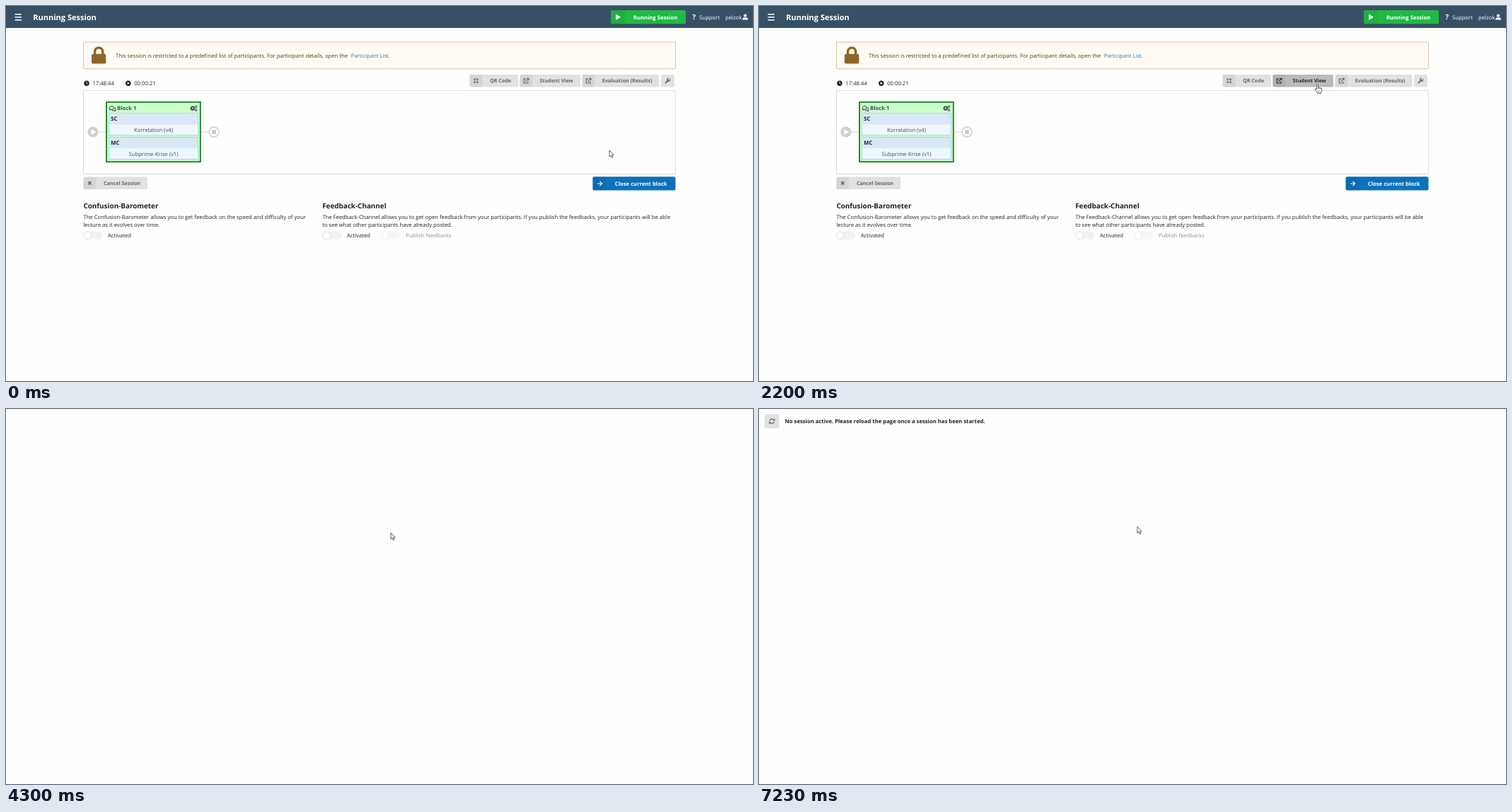
Write an HTML page that moves like this. It is 1056x530 px and loops after 8000 ms.

```html
<!DOCTYPE html>
<html lang="en">
<head>
<meta charset="utf-8">
<title>Running Session</title>
<style>
  html, body { margin: 0; width: 100%; height: 100%; overflow: hidden; background: #fefefd; }
  svg { display: block; }
  text { font: 7.7px "Open Sans", sans-serif; fill: #222; text-rendering: geometricPrecision; }
  .b { font-weight: 700; }
  .small { font-size: 7.15px; font-weight: 700; fill: #666; }
  .h { font-size: 9.9px; font-weight: 700; }
  .w { fill: #fff; }
  .mid { text-anchor: middle; fill: #375164; }
  .line { fill: none; stroke: currentColor; }
</style>
</head>
<body>
<svg width="1056" height="530" viewBox="0 0 1056 530">
  <defs>
    <g id="ext" class="line" stroke-width="1.1">
      <path d="M3.5 1.5H.6V7.4H6.4V5M2.8 5.2 7 1M4.6.6H7.4V3.4"/>
    </g>
    <g id="toggle">
      <rect width="27" height="11" rx="5.5" fill="#f1f1f1"/>
      <circle cx="5.6" cy="5.5" r="5.3" fill="#fff" stroke="#d6d6d7" stroke-width=".7"/>
    </g>
    <g id="cog">
      <circle r="2" class="line" stroke-width="1.5"/>
      <circle r="2.9" class="line" stroke-width="1" stroke-dasharray="1.14"/>
    </g>
  </defs>

  <g id="session">
    <rect width="1056" height="31" fill="#375164"/>
    <path d="M12.5 11.7H22M12.5 15.7H22M12.5 19.7H22" stroke="#fff" stroke-width="1.5"/>
    <text x="38.3" y="19.8" class="b w" style="font-size:11px">Running Session</text>
    <rect x="855" y="6" width="106" height="19.3" rx="2" fill="#21ba45"/>
    <path d="M857 6H875V25.3H857A2 2 0 0 1 855 23.3V8A2 2 0 0 1 857 6Z" fill="#000" opacity=".05"/>
    <path d="M862 11.6 869 15.7 862 19.8Z" fill="#fff"/>
    <text x="886.7" y="18.5" class="b w">Running Session</text>
    <text x="970.2" y="19.3" class="b w" style="font-size:10px">?</text>
    <text x="980" y="18.6" class="w">Support</text>
    <text x="1017" y="18.6" class="w">pelzok</text>
    <circle cx="1045" cy="13.6" r="2.1" fill="#fff"/>
    <path d="M1041.2 19.6V18.4Q1041.2 16.2 1043.4 16.2H1046.6Q1048.8 16.2 1048.8 18.4V19.6Z" fill="#fff"/>

    <rect x="109.5" y="51" width="837" height="37.8" rx="2" fill="#fffaf3" stroke="#c9ba9b" stroke-width=".8"/>
    <rect x="121" y="67.8" width="20.3" height="13.8" rx="2" fill="#794b02" opacity=".85"/>
    <path d="M125.6 68V64.5A5.5 5.5 0 0 1 136.7 64.5V68" fill="none" stroke="#8d662a" stroke-width="3.4"/>
    <text x="155" y="72.6" style="fill:#573a08">This session is restricted to a predefined list of participants. For participant details, open the</text>
    <text x="487.8" y="72.6" style="fill:#3376b8">Participant List</text>
    <text x="540.8" y="72.6" style="fill:#573a08">.</text>

    <circle cx="114" cy="109.2" r="3.7" fill="#222"/>
    <path d="M114 106.7V109.4L115.6 110.6" fill="none" stroke="#fff" stroke-width=".9"/>
    <text x="122.4" y="112">17:48:44</text>
    <circle cx="172.8" cy="109.2" r="3.7" fill="#222"/>
    <path d="M171.6 107.3 175 109.2 171.6 111.1Z" fill="#fff"/>
    <text x="181.2" y="112">00:00:21</text>

    <g color="#666">
      <g fill="#e0e1e2">
        <rect x="655.6" y="97" width="68.4" height="17.5" rx="2"/>
        <rect id="view" x="726.2" y="97" width="85.8" height="17.5" rx="2"/>
        <rect x="814.4" y="97" width="109" height="17.5" rx="2"/>
        <rect x="926" y="97" width="18.8" height="17.5" rx="2"/>
        <rect x="109.4" y="241.6" width="90.6" height="17.4" rx="2"/>
      </g>
      <g opacity=".05">
        <rect x="655.6" y="97" width="17.7" height="17.5" rx="2"/>
        <rect x="726.2" y="97" width="17.7" height="17.5" rx="2"/>
        <rect x="814.4" y="97" width="17.7" height="17.5" rx="2"/>
        <rect x="109.4" y="241.6" width="17.7" height="17.4" rx="2"/>
      </g>
      <path d="M661.3 102.6h2.6v2.6h-2.6zM665.2 102.6h2.6v2.6h-2.6zM661.3 106.4h2.6v2.6h-2.6zM665.2 106.4h2.6v2.6h-2.6z" fill="#777"/>
      <text x="684" y="108.3" class="small">QR Code</text>
      <g id="viewLabel">
        <use href="#ext" x="731.4" y="101.6"/>
        <text x="754.6" y="108.3" class="small" style="fill:currentColor">Student View</text>
      </g>
      <use href="#ext" x="819.6" y="101.6"/>
      <text x="842.8" y="108.3" class="small">Evaluation (Results)</text>
      <path d="M932.4 108.6 935.9 105.1" class="line" stroke-width="1.7" stroke-linecap="round"/>
      <path d="M938.3 103.2A2 2 0 1 1 936.7 102.3" class="line" stroke-width="1.4"/>
      <path d="M116.2 248 120.4 252.4M120.4 248 116.2 252.4" class="line" stroke-width="1.6"/>
      <text x="138" y="252.9" class="small">Cancel Session</text>
    </g>

    <rect x="109.5" y="119.5" width="836.8" height="117.8" fill="none" stroke="#d4d4d5" stroke-width=".8"/>
    <path d="M130 178H142M275 178H287" stroke="#d0d0d0"/>
    <circle cx="122.9" cy="178" r="7.6" fill="#d0d0d0"/>
    <path d="M120.6 174 127.2 178 120.6 182Z" fill="#fff"/>
    <circle cx="294" cy="178" r="6.9" fill="none" stroke="#d0d0d0" stroke-width="1.5"/>
    <rect x="291.2" y="175.2" width="5.6" height="5.6" fill="#c8c8c8"/>

    <rect x="142" y="135.8" width="132.8" height="84.4" fill="#cfc" stroke="#138022" stroke-width="1.8"/>
    <g color="#333">
      <path d="M147 146.3Q145 142 149.5 141.4 153 142 152 145 150 147 148.2 146.3L146.2 147.2Z" class="line" stroke-width="1"/>
      <path d="M153.2 143.2Q155.6 145 153.9 147L154.8 148.6 152.6 147.9Q150.8 148.4 149.8 147.2" class="line" stroke-width="1"/>
      <use href="#cog" x="263.7" y="144.6"/>
      <use href="#cog" transform="translate(268.4 142.4) scale(.58)"/>
      <use href="#cog" transform="translate(268.4 147) scale(.58)"/>
    </g>
    <text x="157" y="147.4" class="b" style="fill:#375164">Block 1</text>
    <g stroke="#9dbfe6" stroke-width=".7">
      <rect x="145.3" y="151.8" width="126.2" height="31" fill="#eff6fb"/>
      <rect x="145.3" y="185.5" width="126.2" height="31" fill="#eff6fb"/>
    </g>
    <path d="M145.7 152.2H271.1V167.4H145.7ZM145.7 185.9H271.1V201.1H145.7Z" fill="#d8e8f6"/>
    <text x="148.3" y="162" class="b">SC</text>
    <text x="208.5" y="178" class="mid">Korrelation (v4)</text>
    <text x="148.3" y="195.9" class="b">MC</text>
    <text x="208.5" y="211.7" class="mid">Subprime-Krise (v1)</text>

    <rect id="close" x="829.4" y="241.2" width="117" height="19.4" rx="2" fill="#0d71bb"/>
    <rect x="829.4" y="241.2" width="19.6" height="19.4" rx="2" opacity=".05"/>
    <path d="M836 251H842.4M839.4 247.8 842.6 251 839.4 254.2" fill="none" stroke="#fff" stroke-width="1.2"/>
    <text x="860.8" y="253.8" class="b w">Close current block</text>

    <text x="109.4" y="286.4" class="h">Confusion-Barometer</text>
    <text x="109.4" y="301.2">The Confusion-Barometer allows you to get feedback on the speed and difficulty of your</text>
    <text x="109.4" y="312.2">lecture as it evolves over time.</text>
    <use href="#toggle" x="109.4" y="318.8"/>
    <text x="144" y="327">Activated</text>
    <text x="447.2" y="286.4" class="h">Feedback-Channel</text>
    <text x="447.2" y="301.2">The Feedback-Channel allows you to get open feedback from your participants. If you publish the feedbacks, your participants will be able</text>
    <text x="447.2" y="312.2">to see what other participants have already posted.</text>
    <use href="#toggle" x="447.2" y="318.8"/>
    <text x="482" y="327">Activated</text>
    <g opacity=".5">
      <use href="#toggle" x="530.2" y="318.8"/>
      <text x="565" y="327">Publish feedbacks</text>
    </g>
  </g>

  <g id="notice">
    <rect x="8" y="7.7" width="20.6" height="19.6" rx="1.8" fill="#e0e1e2"/>
    <g id="reload" color="#666" class="line" stroke-width="1.2">
      <path d="M14.9 16.6A3.5 3.5 0 0 1 21 15.4M21.5 18A3.5 3.5 0 0 1 15.4 19.2"/>
      <path d="M22 13.8V16.2H19.5M14.4 20.8V18.4H16.9" stroke-width="1"/>
    </g>
    <text x="36.6" y="20.1" class="b">No session active. Please reload the page once a session has been started.</text>
  </g>

  <circle id="ring" fill="#fff" fill-opacity=".3" stroke="#e8252b" stroke-width="2.8"/>
  <g id="cursor" fill="#fff" stroke="#333" stroke-width=".8" stroke-linejoin="round">
    <path id="arrow" d="M0 0V9L2 7.2 3.5 10.4 4.9 9.8 3.5 6.7H6.2Z"/>
    <g id="hand">
      <path d="M-1 7V.6Q-1-.5 0-.5T1 .6V4.3Q2.4 3.6 2.8 4.7 4.1 4 4.5 5.2 5.9 4.8 5.9 6.2V8.6Q5.7 10 4.9 11V12.3H-.3V11.2Q-2.1 9.3-3.4 6.8-3.4 5.6-2.3 5.7Z"/>
      <path d="M1 4.3V6.4M2.8 4.7V6.5M4.5 5.2V6.7M1 8.4V10.4M2.6 8.4V10.4" stroke-width=".6"/>
    </g>
  </g>
</svg>
<script>
const $ = id => document.getElementById(id);
const show = (id, on) => $(id).style.display = on ? "" : "none";
const clamp = x => Math.max(0, Math.min(1, x));
const fade = (t, start, ms = 100) => clamp((t - start) / ms);
const mix = (a, b, p) => a.map((v, i) => v + (b[i] - v) * p);
const rgb = c => `rgb(${c.map(Math.round)})`;

// time, x, y of the pointer tip
const path = [
  [0, 853, 204], [560, 792, 114], [800, 791, 113], [930, 791, 113], [1250, 789.5, 111],
  [3160, 789.5, 111], [3530, 736.3, 114.5], [3960, 570, 161], [4300, 544, 175],
  [4530, 549.2, 179], [5400, 549.2, 179], [5860, 536.5, 166.5], [6000, 535.8, 166.3],
  [6700, 535.8, 166.3], [6800, 534.8, 166.3], [8000, 534.8, 166.3]
];

function pointer(t) {
  const i = path.findIndex(k => k[0] > t);
  const [a, b] = [path[i - 1], path[i]];
  const p = (t - a[0]) / (b[0] - a[0]);
  return mix(a, b, p * p * (3 - 2 * p)).slice(1);
}

function draw(now) {
  const t = now % 8000;
  const inSession = t < 2360;
  show("session", inSession);
  show("notice", t >= 5400);
  show("reload", t >= 7230);

  const hover = mix([224, 225, 226], [202, 203, 205], fade(t, 570));
  const press = fade(t, 1250);
  $("view").setAttribute("fill", rgb(mix(hover, [186, 187, 188], press)));
  $("viewLabel").setAttribute("color", rgb(mix([102, 102, 102], [40, 40, 40], press)));
  const blur = fade(t, 1300) - fade(t, 1630);
  $("close").setAttribute("fill", rgb(mix([13, 113, 187], [33, 133, 208], blur)));

  const p = fade(t, 1250, 950);
  show("ring", p > 0 && p < 1);
  $("ring").setAttribute("cx", 789.3);
  $("ring").setAttribute("cy", 111);
  $("ring").setAttribute("r", 27 * p * (2 - p));
  $("ring").setAttribute("opacity", 1 - p ** 1.5);

  const hand = t >= 540 && inSession;
  show("hand", hand);
  show("arrow", !hand);
  $("cursor").setAttribute("transform", `translate(${pointer(t)})`);
}

let start;
function tick(now) {
  start ??= now;
  draw(now - start);
  requestAnimationFrame(tick);
}
draw(0);
requestAnimationFrame(tick);
</script>
</body>
</html>
```
